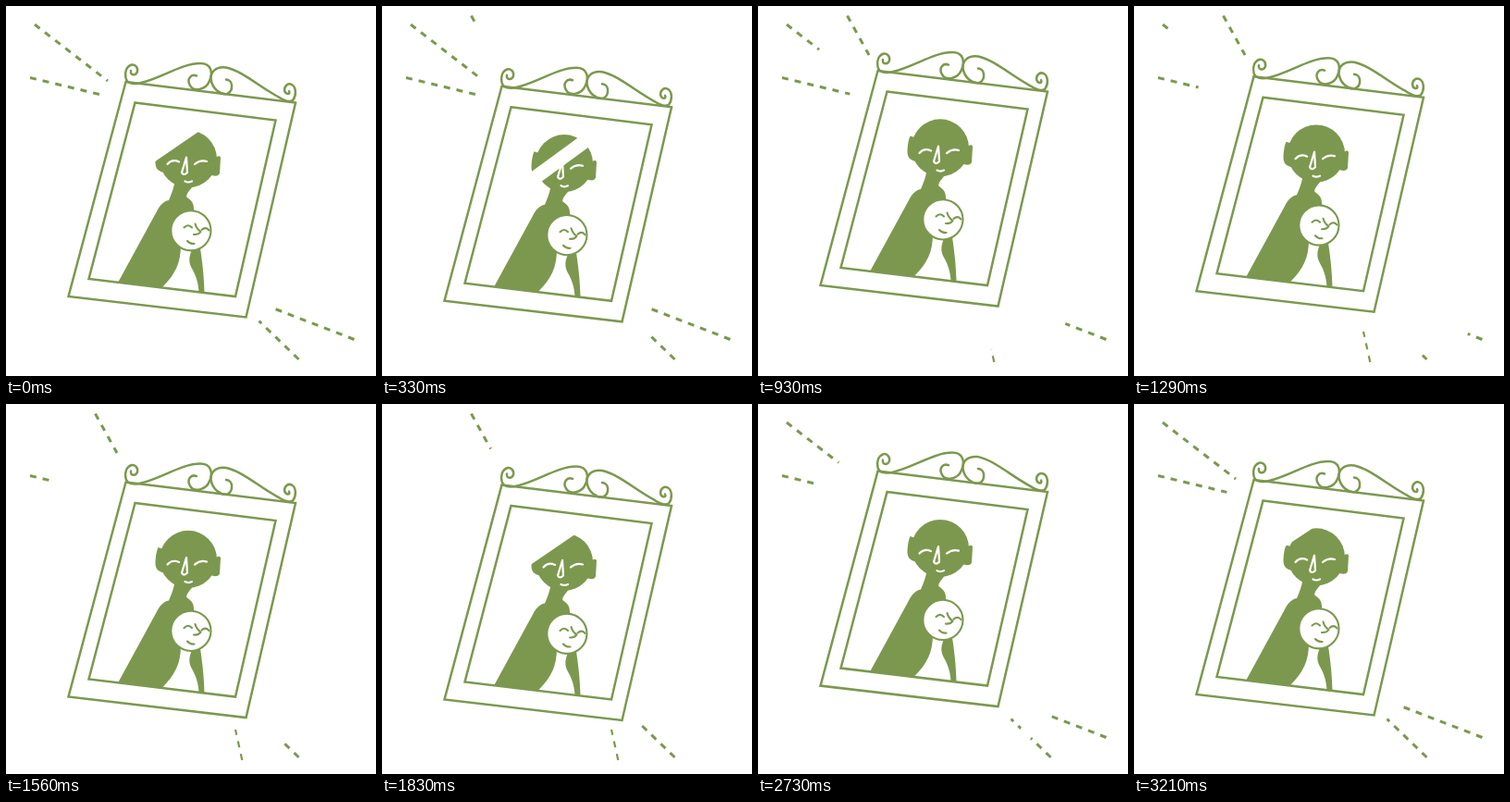
Animation of 400 by 400 pixels, one loop 3240 ms. Source, as an HTML page:

```html
<!DOCTYPE html>
<html lang="en">
<head>
<meta charset="utf-8">
<title>Family portrait</title>
<style>
  html, body { margin: 0; width: 100%; height: 100%; overflow: hidden; background: #fff; }
  svg { display: block; width: 100vw; height: 100vh; }
  .line { fill: none; stroke: #7c984f; stroke-width: 2.5; stroke-linecap: round; }
  .green { fill: #7c984f; }
  .white { fill: #fff; }
  .face { fill: none; stroke: #fff; stroke-width: 2.2; stroke-linecap: round; stroke-linejoin: round; }
  .small { stroke: #7c984f; stroke-width: 2.1; }
  #rays line { stroke: #7c984f; stroke-width: 3; stroke-dasharray: 7 7; }
</style>
</head>
<body>
<svg viewBox="0 0 400 400">
  <g id="rays"></g>
  <g id="portrait">
    <!-- parent -->
    <g class="green">
      <path d="M183 188C181 198 179 203 176 210C170 211 166 216 163 222L121 299L214.5 310C214 290 212 275 210 262L203 219C203 211 199 210 195 206C196 200 202 197 204 191Z"/>
      <path d="M164.5 152.5L172 155L171 180C165 179 161 176 161.5 168Q162 158 164.5 152.5Z"/>
      <path d="M223 164C228 164 231 160 232 164L231 181C229 185 224 184 221 182Z"/>
      <circle cx="197" cy="165.3" r="31"/>
    </g>
    <g class="face">
      <path d="M174.5 171Q180 165 187 168.500M204 171Q210 166 217 168"/>
      <path d="M195 163.5L190 180Q192 184 196 180Z"/>
      <path d="M193.5 189.5Q197 191.500 201 189.500"/>
    </g>
    <!-- child -->
    <path class="white" d="M189 258C189 278 183 290 169 304L208.5 309.5C208 297 204 289 200 282C196.5 274 199 267 203 260Z"/>
    <circle class="white small" cx="199.900" cy="242.800" r="21.600"/>
    <g class="face small">
      <path d="M192.5 239.5Q197 235 201 239.500M211.500 242Q216 238 219.500 242.500"/>
      <path d="M204.5 235.5Q206 241 210.5 244Q208 247.500 203 247"/>
      <path d="M196 254Q199 257.5 203.5 257"/>
    </g>
    <rect id="band" class="white" x="-150" width="300" height="15"/>
    <!-- frame -->
    <g class="line">
      <path d="M129.5 82L313 104.500L259.500 336.500L67.500 314Z"/>
      <path d="M139.5 104.5L291.5 123.500L248 314L89.500 295Z"/>
      <path d="M135 70C134 75 140 76 142 71C143 66 139 63 136 63.500C130 65 128 72 129.500 78C131 84 138 85 146 83C168 78 190 62 210 62C222 62 224 72 220 81C216 91 203 93 199 86C195 79 200 73 206 75.500"/>
      <path d="M306 92C308 96 302 96 301 91C301 86 305 83 309 85C314 88 314 97 310 102C306 104.500 300 102 294 98C275 88 255 70 238 66.500C226 65 221 72 221.500 79C223 90 232 96 239 95C246 92 246 80 238 79.500"/>
    </g>
  </g>
</svg>
<script>
const LOOP = 3240;
const portrait = document.getElementById('portrait');
const band = document.getElementById('band');

const clamp01 = p => Math.min(1, Math.max(0, p));
const ramp = (t, start, duration) => clamp01((t - start) / duration);
const swing = p => (1 - Math.cos(Math.PI * p)) / 2;

// The portrait rises and falls twice, resting level at the loop point.
const HIGH = -12, LOW = 5.6;
const moves = [[0, 230, LOW], [230, 950, HIGH], [950, 1790, LOW], [1790, 2520, HIGH], [2520, 3200, 0]];

function bob(t) {
  let y = 0, last = 0;
  for (const [start, end, goal] of moves) {
    y += (goal - last) * swing(ramp(t, start, end - start));
    last = goal;
  }
  return y;
}

// A shine enters at the top left, then speeds up and tilts on its way down.
const LEAD = 150, passes = [0, 1830, LOOP];

function shine(t) {
  const u = t - passes.findLast(start => t >= start - LEAD);
  const height = u < 0 ? 18 - u / 3 : Math.max(-200, 18 - 72 * (u / 480) ** 3.5);
  return { height, angle: 36 - 0.09 * height };
}

// Rays grow from a fixed outer end and shrink back to it at one speed.
const RAY_SPEED = 0.085;
const rays = [
  { from: [31, 20], to: [110, 81], hide: 277, show: 1895 },
  { from: [26, 77.5], to: [101, 95.5], hide: 910, show: 2310 },
  { from: [96.5, 10.5], to: [120, 53], show: 240, hide: 1770 },
  { from: [376.5, 360.5], to: [291, 327.5], hide: 410, show: 1903 },
  { from: [316.5, 382], to: [273.5, 340.5], hide: 50, show: 1215 },
  { from: [255.3, 385], to: [248, 352], show: 760, hide: 2045, width: 2.2 }
];

for (const ray of rays) {
  const { from: [x, y], to, width = 3 } = ray;
  ray.duration = Math.hypot(to[0] - x, to[1] - y) / RAY_SPEED;
  ray.el = document.createElementNS('http://www.w3.org/2000/svg', 'line');
  ray.el.setAttribute('x1', x);
  ray.el.setAttribute('y1', y);
  ray.el.style.strokeWidth = width;
  document.getElementById('rays').append(ray.el);
}

function drawRay({ el, from, to, show, hide, duration }, t) {
  const shown = (hide < show) + ramp(t, show, duration) - ramp(t, hide, duration);
  el.style.display = shown > 0 ? '' : 'none';
  el.setAttribute('x2', from[0] + (to[0] - from[0]) * shown);
  el.setAttribute('y2', from[1] + (to[1] - from[1]) * shown);
}

function draw(t) {
  portrait.setAttribute('transform', `translate(0 ${bob(t)})`);
  const { height, angle } = shine(t);
  band.setAttribute('transform', `translate(197 165.3) rotate(${-angle}) translate(0 ${-height - 15})`);
  rays.forEach(ray => drawRay(ray, t));
}

let start;
function tick(now) {
  start ??= now;
  draw((now - start) % LOOP);
  requestAnimationFrame(tick);
}
draw(0);
requestAnimationFrame(tick);
</script>
</body>
</html>
```
